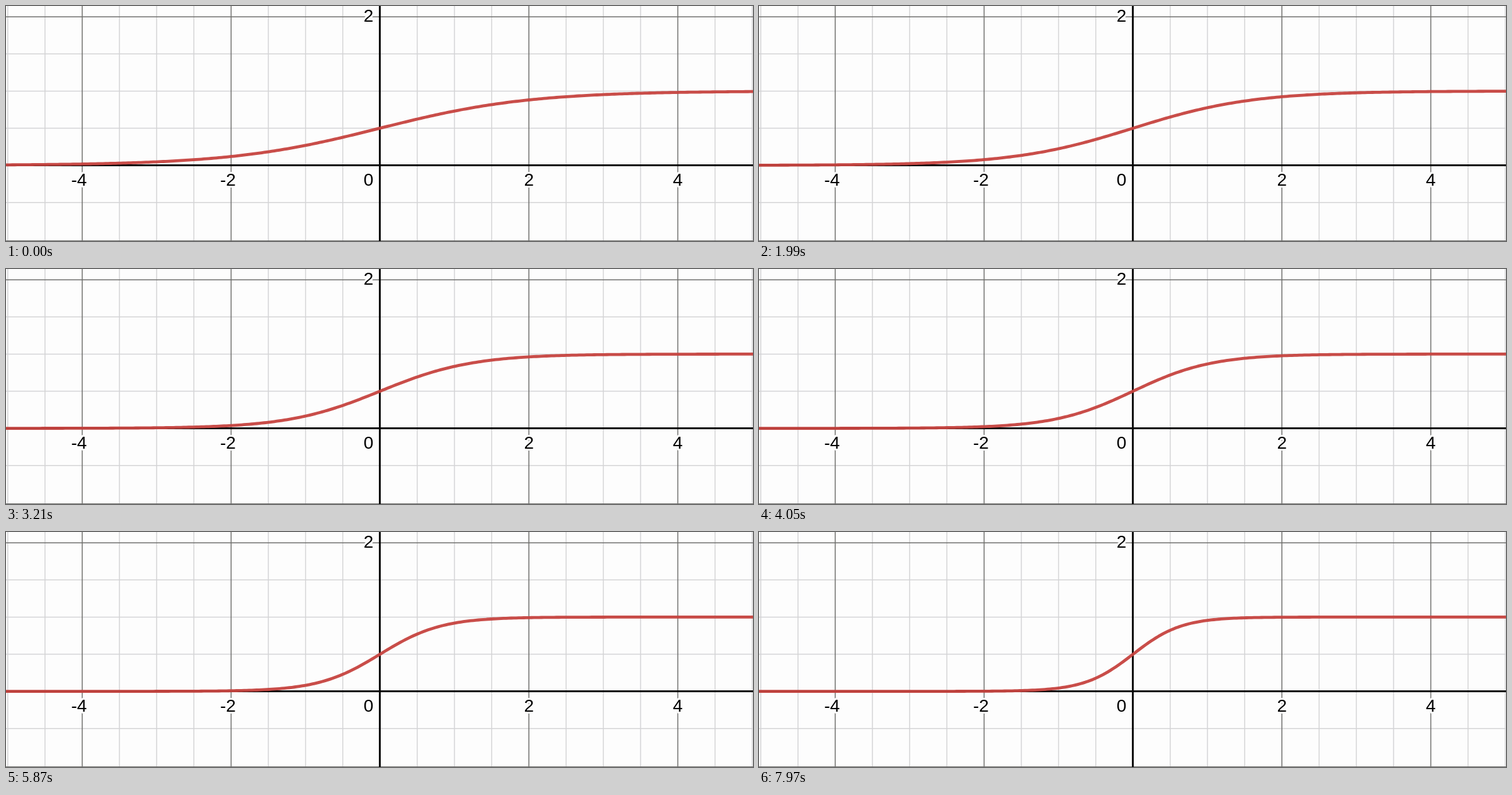
These frames come from a looping animation (1186 by 374 pixels, 7990 ms). An HTML page:

```html
<!DOCTYPE html>
<html lang="en">
<head>
<meta charset="utf-8">
<title>Logistic curve</title>
<style>
  html, body { margin: 0; width: 100%; height: 100%; overflow: hidden; background: #fdfdfd; }
  svg { display: block; width: 1186px; height: 374px; }
  text {
    font: 28px "Liberation Sans", Arial, sans-serif;
    fill: #000; stroke: #fdfdfd; stroke-width: 6px; stroke-linejoin: round; paint-order: stroke;
  }
  path { fill: none; }
</style>
</head>
<body>
<svg viewBox="0 0 1186 374">
  <path id="minor" stroke="#d4d4d6" stroke-width="1.5"/>
  <path id="major" stroke="#70706e" stroke-width="1.5"/>
  <path id="axes" stroke="#080808" stroke-width="3"/>
  <g id="labels"></g>
  <path id="curve" stroke="#c74440" stroke-width="4.8" stroke-opacity=".95" stroke-linejoin="round"/>
</svg>
<script>
const WIDTH = 1186, HEIGHT = 374, LOOP = 7990;
const UNIT = 118.2, ORIGIN_X = 593.8, ORIGIN_Y = 253.6;
const byId = id => document.getElementById(id);
const toX = x => ORIGIN_X + x * UNIT;
const toY = y => ORIGIN_Y - y * UNIT;
const vertical = x => `M${toX(x)} 0V${HEIGHT}`;
const horizontal = y => `M0 ${toY(y)}H${WIDTH}`;

function drawGrid() {
  let minor = "", major = "";
  for (let i = -10; i <= 10; i++) {
    if (i % 4) minor += vertical(i / 2);
    else major += vertical(i / 2);
  }
  for (const y of [-0.5, 0.5, 1, 1.5]) minor += horizontal(y);
  major += horizontal(2) + `M0 373.8H${WIDTH}`;
  byId("minor").setAttribute("d", minor);
  byId("major").setAttribute("d", major);
  byId("axes").setAttribute("d", `M593.5 0V${HEIGHT}M0 253.5H${WIDTH}`);
}

function addLabel(text, x, y) {
  const label = document.createElementNS("http://www.w3.org/2000/svg", "text");
  label.textContent = text;
  label.setAttribute("x", x);
  label.setAttribute("y", y);
  label.setAttribute("text-anchor", "middle");
  byId("labels").append(label);
}

function drawLabels() {
  for (const n of [-4, -2, 2, 4]) addLabel(n, toX(n) - (n < 0 ? 5 : 0), 286);
  addLabel(0, 575.5, 286);
  addLabel(2, 575.5, 25);
}

// Updates come in a 100, 20, 20 ms rhythm.
function snap(time) {
  const phase = (time + 110) % 140;
  return time - phase + (phase < 100 ? 0 : phase < 120 ? 100 : 120);
}

// Holds, eases in, then grows at a steady rate.
function steepness(time) {
  const ease = 1.2;
  const s = Math.max(0, (snap(time) - 590) / 1000);
  return 1 + 0.305 * (s < ease ? s * s / (2 * ease) : s - ease / 2);
}

function render(time) {
  const k = steepness(time);
  let d = "";
  for (let px = -6; px <= WIDTH + 6; px += 4) {
    const x = (px - ORIGIN_X) / UNIT;
    d += `${d ? "L" : "M"}${px} ${toY(1 / (1 + Math.exp(-k * x))).toFixed(2)}`;
  }
  byId("curve").setAttribute("d", d);
}

function tick() {
  render((performance.now() - start) % LOOP);
  requestAnimationFrame(tick);
}

drawGrid();
drawLabels();
const start = performance.now();
tick();
</script>
</body>
</html>
```
